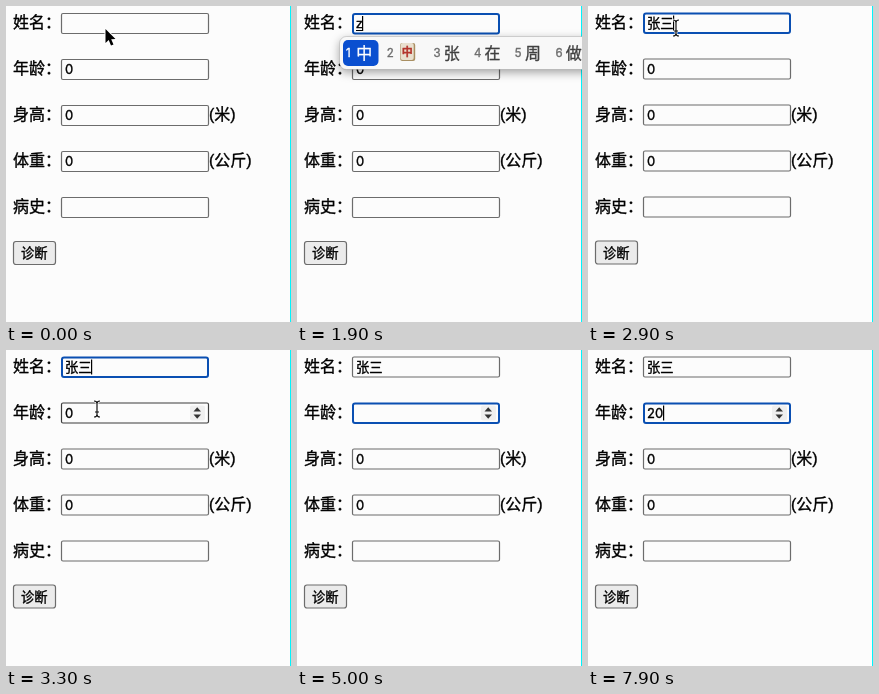
Animation, 285 px wide and 316 px high, one loop 8 s. Source, as an HTML page with a canvas:

```html
<!DOCTYPE html>
<html lang="zh-CN">
<head>
<meta charset="utf-8">
<style>
  html, body { margin: 0; width: 100%; height: 100%; overflow: hidden; background: #fcfcfc; }
  canvas { display: block; width: 285px; height: 316px; }
</style>
</head>
<body>
<canvas id="stage"></canvas>
<script>
const W = 285, H = 316, LOOP = 8000;
const CJK = '"Noto Sans CJK SC", "Noto Sans CJK", sans-serif';
const FIELD = '13.333px "Liberation Sans", ' + CJK;
const DIGITS = '13px Inter, sans-serif';
const LABEL = '16px "Liberation Sans", ' + CJK;
const PAGE = '#fcfcfc', RING = '#0a4fb2', BLUE = '#0a4fd0', BORDER = '#6c6c6c';

const canvas = document.getElementById('stage');
const ctx = canvas.getContext('2d');
const dpr = window.devicePixelRatio || 1;
canvas.width = W * dpr;
canvas.height = H * dpr;

const rows = [
  { label: '姓名：' },
  { label: '年龄：' },
  { label: '身高：', value: '0', unit: '(米)' },
  { label: '体重：', value: '0', unit: '(公斤)' },
  { label: '病史：', value: '' }
];

// Each entry holds from its time until the next one.
const names = [
  [0, ''], [1700, 'z'], [2000, 'zh'], [2100, 'zha'], [2200, 'zhan'],
  [2300, 'zhang'], [2400, 'zhang s'], [2500, 'zhang sa'],
  [2600, 'zhang san'], [2700, '张三']
];
const ages = [[0, '0'], [4200, ''], [7800, '2'], [7900, '20']];
const words = [
  [0, '中 🀄 张 在 周 做'], [2000, '中 这 张 着 周 只'],
  [2100, '扎 炸 渣 眨 张 战'], [2200, '站 战 占 展 张 沾'],
  [2300, '张 长 章 涨 掌 丈'], [2500, '张撒 张 长 章 涨 掌'],
  [2600, '张三 张 长 章 涨 掌']
];
const popupAlpha = [[0, 0], [1800, 0.6], [1900, 1], [2700, 0.4], [2800, 0]];
const pointer = [
  [0, 'arrow', 99, 22], [100, 'arrow', 150, 72], [200, 'arrow', 206, 128],
  [300, 'arrow', 140, 56], [400, 'arrow', 72, 1], [600, 'arrow', 105, 22],
  [900, 'beam', 89, 18], [1000, 'beam', 88, 21], [1100, 'beam', 87, 20],
  [1700, 'none', 0, 0], [2900, 'beam', 88, 22], [3000, 'arrow', 90, 31],
  [3100, 'arrow', 92, 42], [3200, 'beam', 92, 55], [3300, 'beam', 91, 59],
  [3500, 'beam', 92, 66], [3700, 'beam', 91, 59], [4200, 'none', 0, 0]
];

function at(track, t) {
  let hit = track[0];
  for (const key of track) if (key[0] <= t) hit = key;
  return hit;
}

// A hairline stroke gives the slightly heavier screen weight.
function text(str, x, y, font, color = '#000') {
  ctx.font = font;
  ctx.fillStyle = ctx.strokeStyle = color;
  ctx.lineWidth = 0.35;
  ctx.lineJoin = 'round';
  ctx.fillText(str, x, y);
  ctx.strokeText(str, x, y);
}

function box(x, y, w, h, r, fill, stroke, line = 1.2) {
  ctx.beginPath();
  ctx.roundRect(x, y, w, h, r);
  if (fill) { ctx.fillStyle = fill; ctx.fill(); }
  if (stroke) { ctx.strokeStyle = stroke; ctx.lineWidth = line; ctx.stroke(); }
}

function poly(points, fill, stroke) {
  ctx.beginPath();
  points.forEach(([x, y]) => ctx.lineTo(x, y));
  ctx.closePath();
  if (stroke) { ctx.strokeStyle = stroke; ctx.lineWidth = 2; ctx.lineJoin = 'round'; ctx.stroke(); }
  ctx.fillStyle = fill;
  ctx.fill();
}

function field(y, value, font, state, caret, composing) {
  if (state === 'focus') box(56, y + 1, 146, 19.5, 2, PAGE, RING, 2);
  else box(55.5, y + 0.5, 147, 20, 1.5, PAGE, state === 'hover' ? '#3c3c3c' : BORDER);
  text(value, 59, y + 15, font);
  const w = ctx.measureText(value).width;
  ctx.fillStyle = '#000';
  if (composing) ctx.fillRect(59, y + 17, w, 1);
  if (caret) ctx.fillRect(Math.floor(59 + w), y + 3, 1.2, 15);
}

function spinner(y) {
  box(184, y + 3, 15, 15, 2, '#efefef');
  poly([[187.5, y + 9], [191.2, y + 4.8], [195, y + 9]], '#333');
  poly([[187.5, y + 12], [191.2, y + 16.2], [195, y + 12]], '#333');
}

function tile(x, y) {
  box(x, y, 15, 18, 2, '#a98f62');
  box(x + 0.5, y, 13, 17, 2, '#e9e0cf');
  text('中', x + 1.5, y + 13, 'bold 11px ' + CJK, '#b3352c');
}

function popup(list, alpha) {
  ctx.save();
  ctx.globalAlpha = alpha;
  ctx.shadowColor = 'rgba(0,0,0,.36)';
  ctx.shadowBlur = 10 * dpr;
  ctx.shadowOffsetY = 3 * dpr;
  box(42.5, 30.5, 270, 33, 7, '#f8f8f8');
  ctx.shadowColor = 'transparent';
  box(42.5, 30.5, 270, 33, 7, null, 'rgba(0,0,0,.14)', 1);
  let x = 49;
  list.split(' ').forEach((word, i) => {
    const isTile = word === '🀄';
    const w = isTile ? 22 : 16 * word.length;
    if (!i) box(46, 34, w + 19.5, 26, 5, BLUE);
    text(i + 1, x, 51, '11.5px Inter, sans-serif', i ? '#6c6c6c' : '#fff');
    if (isTile) tile(x + 13.5, 37);
    else text(word, x + 10.3, 52.6, LABEL, i ? '#404040' : '#fff');
    x += w + 24.7;
  });
  ctx.restore();
}

function arrow(x, y) {
  const shape = [[0, 0], [0, 14], [3.2, 11], [5.5, 16.5], [8, 15.4], [5.7, 10.2], [10, 10]];
  poly(shape.map(([a, b]) => [x + 0.5 + a, y + 1 + b]), '#000', '#fff');
}

function beam(x, y) {
  const trace = (color, line) => {
    ctx.strokeStyle = color;
    ctx.lineWidth = line;
    ctx.beginPath();
    for (const s of [-1, 1]) {
      ctx.moveTo(x - 3, y + 8 * s);
      ctx.quadraticCurveTo(x, y + 8 * s, x, y + 5.5 * s);
      ctx.quadraticCurveTo(x, y + 8 * s, x + 3, y + 8 * s);
    }
    ctx.moveTo(x, y - 6);
    ctx.lineTo(x, y + 6);
    ctx.moveTo(x - 2, y + 3);
    ctx.lineTo(x + 2, y + 3);
    ctx.stroke();
  };
  trace('#fff', 2.6);
  trace('#111', 1.2);
}

function form(t) {
  const nameFocus = t >= 1200 && t < 3500;
  const ageFocus = t >= 3500;
  const ageHover = t >= 3200 && t < 3500;
  const blink = t < 4000 || t >= 7800 || (t >= 4500 && t % 1000 >= 500);

  rows.forEach((row, i) => {
    const y = 7 + 46 * i;
    text(row.label, 7, y + 15, LABEL);
    if (row.unit) text(row.unit, 203, y + 15, LABEL);
    if (i === 0) {
      const state = nameFocus ? 'focus' : t >= 900 && t < 1200 ? 'hover' : '';
      field(y, at(names, t)[1], FIELD, state, nameFocus, t >= 1700 && t < 2700);
    } else if (i === 1) {
      const state = ageFocus ? 'focus' : ageHover ? 'hover' : '';
      field(y, at(ages, t)[1], DIGITS, state, ageFocus && blink);
      if (ageFocus || ageHover) spinner(y);
    } else {
      field(y, row.value, DIGITS);
    }
  });

  box(7.5, 235.5, 42, 23, 2.5, '#ebebeb', BORDER);
  text('诊断', 15, 252, FIELD);
}

function draw(t) {
  ctx.setTransform(dpr, 0, 0, dpr, 0, 0);
  ctx.fillStyle = PAGE;
  ctx.fillRect(0, 0, W, H);
  ctx.fillStyle = '#00f4fc';
  ctx.fillRect(284, 0, 1, H);

  // The page settles slightly higher once the name is entered.
  ctx.save();
  if (t >= 2700) ctx.translate(0, -0.5);
  form(t);
  ctx.restore();

  const alpha = at(popupAlpha, t)[1];
  if (alpha) popup(at(words, t)[1], alpha);

  const [, kind, x, y] = at(pointer, t);
  if (kind === 'arrow') arrow(x, y);
  if (kind === 'beam') beam(x, y);
}

const start = performance.now();
function tick() {
  draw((performance.now() - start) % LOOP);
  requestAnimationFrame(tick);
}
tick();
</script>
</body>
</html>
```
